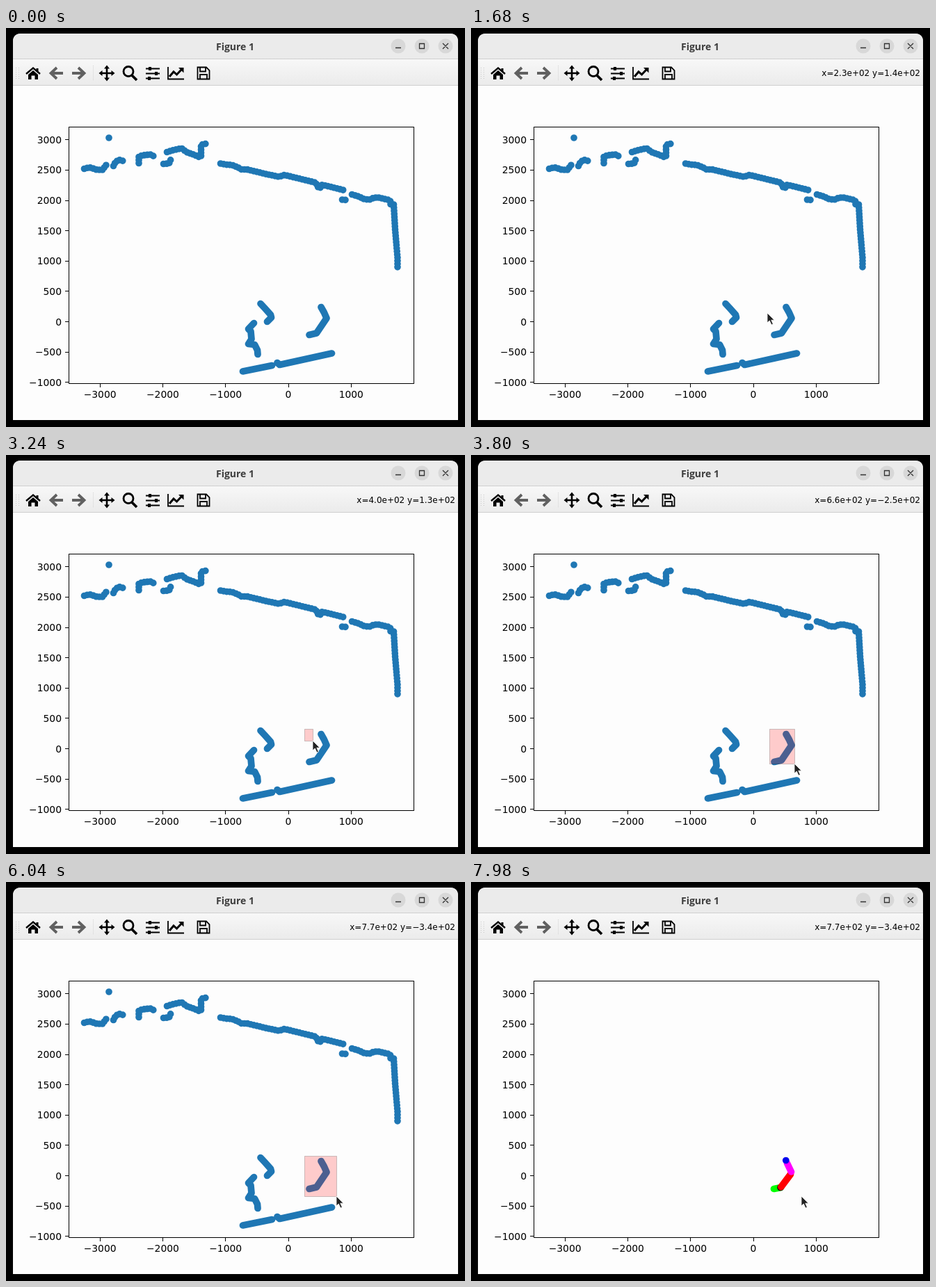
These frames come from a looping animation (660 by 574 pixels, 8 s). An HTML page:

```html
<!DOCTYPE html>
<html lang="en">
<head>
<meta charset="utf-8">
<title>Figure 1</title>
<style>
html, body { margin: 0; width: 100%; height: 100%; overflow: hidden; background: #000; }
svg { display: block; width: 660px; height: 574px; }
text { font-family: "DejaVu Sans", sans-serif; fill: #000; }
.title { font: bold 14px "Open Sans", sans-serif; fill: #3d3d3d; }
.ticks text { font-size: 13.89px; }
.line { fill: none; stroke: #000; stroke-width: 1; }
.dots { fill: none; stroke: #1f77b4; stroke-width: 9.7; stroke-linecap: round; stroke-linejoin: round; transform: translate(-.5px, -.5px); }
.sparse { stroke-dasharray: 0 4.5; }
.icon { fill: none; stroke: #000; stroke-width: 2; }
</style>
</head>
<body>
<svg viewBox="0 0 660 574">
  <defs>
    <linearGradient id="bar" x2="0" y2="1"><stop stop-color="#f8f8f8"/><stop offset="1" stop-color="#ebebeb"/></linearGradient>
    <path id="arrow" d="M-9 0H9M0 -8L-8.5 0L0 8"/>
  </defs>
  <rect width="660" height="574" fill="#000"/>
  <path d="M10 564V20Q10 8 22 8H638Q650 8 650 20V564Z" fill="#fdfdfd"/>
  <path d="M10 44V20Q10 8 22 8H638Q650 8 650 20V44Z" fill="#ebebeb"/>
  <rect x="10" y="44" width="640" height="38" fill="url(#bar)"/>
  <path d="M10 44.5H650M10 82.5H650" stroke="#cfcfcf"/>
  <text class="title" x="329.5" y="32" text-anchor="middle">Figure 1</text>
  <g fill="#d8d8d8">
    <circle cx="564" cy="26" r="10.5"/><circle cx="598" cy="26" r="10.5"/><circle cx="632" cy="26" r="10.5"/>
  </g>
  <path d="M560 28.5H568M594.5 22.5H601.5V29.5H594.5ZM628 22L636 30M636 22L628 30" fill="none" stroke="#333" stroke-width="1.3"/>
  <path d="M14.5 57V74M18.5 57V74" stroke="#c8c8c8" stroke-dasharray="1 2"/>
  <path d="M125.5 54V76" stroke="#d4d4d4" stroke-dasharray="1 1"/>

  <g class="icon">
    <path d="M29 66L39 57.5L49 66" stroke-width="2.4"/>
    <path d="M32 67L39 61L46 67V74H41.5V68.5H36.5V74H32ZM43.5 58H46.5V63L43.5 60.5Z" fill="#000" stroke="none"/>
    <use href="#arrow" transform="translate(73 65)" stroke="#606060" stroke-width="3.8"/>
    <use href="#arrow" transform="translate(104 65) scale(-1 1)" stroke="#606060" stroke-width="3.8"/>
    <path d="M137 65H153M145 57V73" stroke-width="2.6"/>
    <path d="M145 53.5L149 58.5H141ZM145 76.5L149 71.5H141ZM133.5 65L138.5 61V69ZM156.5 65L151.5 61V69Z" fill="#000" stroke="none"/>
    <circle cx="176" cy="62.5" r="7" stroke-width="2.8"/>
    <path d="M181 68L188 75" stroke-width="3.8"/>
    <path d="M201 58.5H221M201 65.5H221M201 72.5H221"/>
    <path d="M207 56V61M216 63V68M206 70V75" stroke-width="4"/>
    <path d="M233 56V73.5H256" stroke-width="1.8"/>
    <path d="M235 70L241 63L245.5 67L253 59" stroke-width="3"/>
    <path d="M248 57H255.5V64.5Z" fill="#000" stroke="none"/>
    <path d="M275.5 56.5H288L292.5 61V73.5H275.5ZM279 57V62.5H287V57M279 73V67H289V73" stroke-width="1.8"/>
  </g>
  <text id="coords" x="646" y="69" font-size="12" text-anchor="end"></text>

  <g class="ticks" id="ticks"></g>
  <g id="scan">
    <path class="dots sparse" id="far"/>
    <path class="dots" id="near"/>
    <rect id="selection" fill="#f00" fill-opacity=".2" stroke="#000" stroke-opacity=".2"/>
  </g>
  <g id="result">
    <path class="dots" d="M436 442L446 440" style="stroke:#0f0"/>
    <path class="dots" d="M445.5 440h0" style="stroke:#200"/>
    <path class="dots" d="M446.5 439L460 421" style="stroke:#f00"/>
    <path class="dots" d="M455 405L461 417.5" style="stroke:#f0f"/>
    <path class="dots" d="M453.3 401h0" style="stroke:#00e"/>
  </g>
  <rect class="line" x="90.5" y="142.5" width="496" height="369"/>
  <path id="cursor" d="M0 0V14L3.3 11L6 17L8.4 16L5.8 10.2H10.2Z" fill="#222" stroke="#fff" stroke-width=".8"/>
</svg>
<script>
const LOOP = 8000, ENTER = 840, DRAG = 2950, RESULT = 6400;
const START = [429.5, 394.5];
const ORIGIN = [406, 422.6], SCALE = [0.0903, -0.0873];
const $ = id => document.getElementById(id);

const farStrokes = [
  "113 203L120 201L127 203L131 204.5H140L143 199L147.5 195",
  "155 199L157 195L162 190L166 191L172 192.5",
  "191.5 195V185L199 183.5L208 182.5L213 185",
  "227 196L235 195.5L237.5 189.5",
  "232 179L240 176.5L253 173.5L260 179L270 182.5L278 186L281 185.5V168.5L290 166.5",
  "309 195.5L317 197L325 197.5L334 201L339 204L347 204L376 211L393 214.5L401 212L446 223L449.5 230L452 231L455 226L487 234",
  "484 247.5L491 248",
  "498 240L508 243L515 246.5L523 247.5L530 244.5L537 244.5L553 248.5L553.5 254L558 254.5L560 290L563.5 331V348"
];
const nearStrokes = [
  "148.5 158.5h0",
  "366.5 397L373 404L381 413L382 417L376 423",
  "357 425L349 433.5L352.5 437L353.5 448L349 455L358 456L362 464L362.5 470",
  "341 494.5L383 486",
  "390.5 482L394 485L469 468.5",
  "453.5 402L458 410L461.5 418L447 439.5L436.5 442"
];
const pathOf = strokes => strokes.map(s => "M" + s).join("");
$("far").setAttribute("d", pathOf(farStrokes));
$("near").setAttribute("d", pathOf(nearStrokes));

const label = n => String(n).replace("-", "−");
let marks = "";
for (let v = -3000; v <= 1000; v += 1000) {
  const x = ORIGIN[0] + v * SCALE[0];
  marks += `<path class="line" d="M${Math.floor(x) + .5} 512v5"/><text x="${x}" y="532" text-anchor="middle">${label(v)}</text>`;
}
for (let v = -1000; v <= 3000; v += 500) {
  const y = ORIGIN[1] + v * SCALE[1];
  marks += `<path class="line" d="M90 ${Math.floor(y) + .5}h-5"/><text x="80" y="${Math.round(y + 5)}" text-anchor="end">${label(v)}</text>`;
}
$("ticks").innerHTML = marks;

// Pointer route: time, x, y
const route = [
  [840, 388, 575], [1000, 404.2, 482], [1300, 416, 440], [1700, 427, 409],
  [2200, 433.1, 394.7], [2650, 433.1, 394.7], [2850, 429.5, 394.5], [2950, 429.5, 394.5],
  [3800, 465.6, 444.5], [4200, 476, 454], [4500, 478.3, 455.9], [4900, 478.3, 455.9],
  [5600, 475.5, 452.3], [8000, 475.5, 452.3]
];

function pointerAt(t) {
  const i = Math.max(1, route.findIndex(k => k[0] >= t));
  const a = route[i - 1], b = route[i];
  const p = Math.max(0, (t - a[0]) / (b[0] - a[0]));
  return [1, 2].map(n => a[n] + (b[n] - a[n]) * p);
}

// One significant digit below a hundred, two above.
function format(value) {
  const v = Math.round(value / 10) * 10;
  const digits = Math.abs(v) >= 100 ? Math.floor(Math.log10(Math.abs(v))) - 1 : 0;
  const [m, e] = v.toExponential(digits).split("e+");
  return label(m) + (digits ? "" : ".") + "e+" + e.padStart(2, "0");
}

const show = (node, on) => node.setAttribute("visibility", on ? "visible" : "hidden");

function draw(t) {
  const [x, y] = pointerAt(t);
  const data = [x, y].map((p, i) => (p - ORIGIN[i]) / SCALE[i]);
  $("cursor").setAttribute("transform", `translate(${Math.round(x - .5)} ${Math.round(y - .5)})`);
  show($("cursor"), t >= ENTER);
  $("coords").textContent = t >= ENTER && y < 511 ? `x=${format(data[0])} y=${format(data[1])}` : "";
  const box = { x: START[0], y: START[1], width: x - START[0], height: y - START[1] };
  for (const key in box) $("selection").setAttribute(key, Math.max(0, key.length > 1 ? Math.round(box[key]) : box[key]));
  const done = t >= RESULT;
  show($("scan"), !done);
  show($("selection"), !done && t > DRAG);
  show($("result"), done);
}

const begin = performance.now();
function tick() {
  draw((performance.now() - begin) % LOOP);
  requestAnimationFrame(tick);
}
tick();
</script>
</body>
</html>
```
